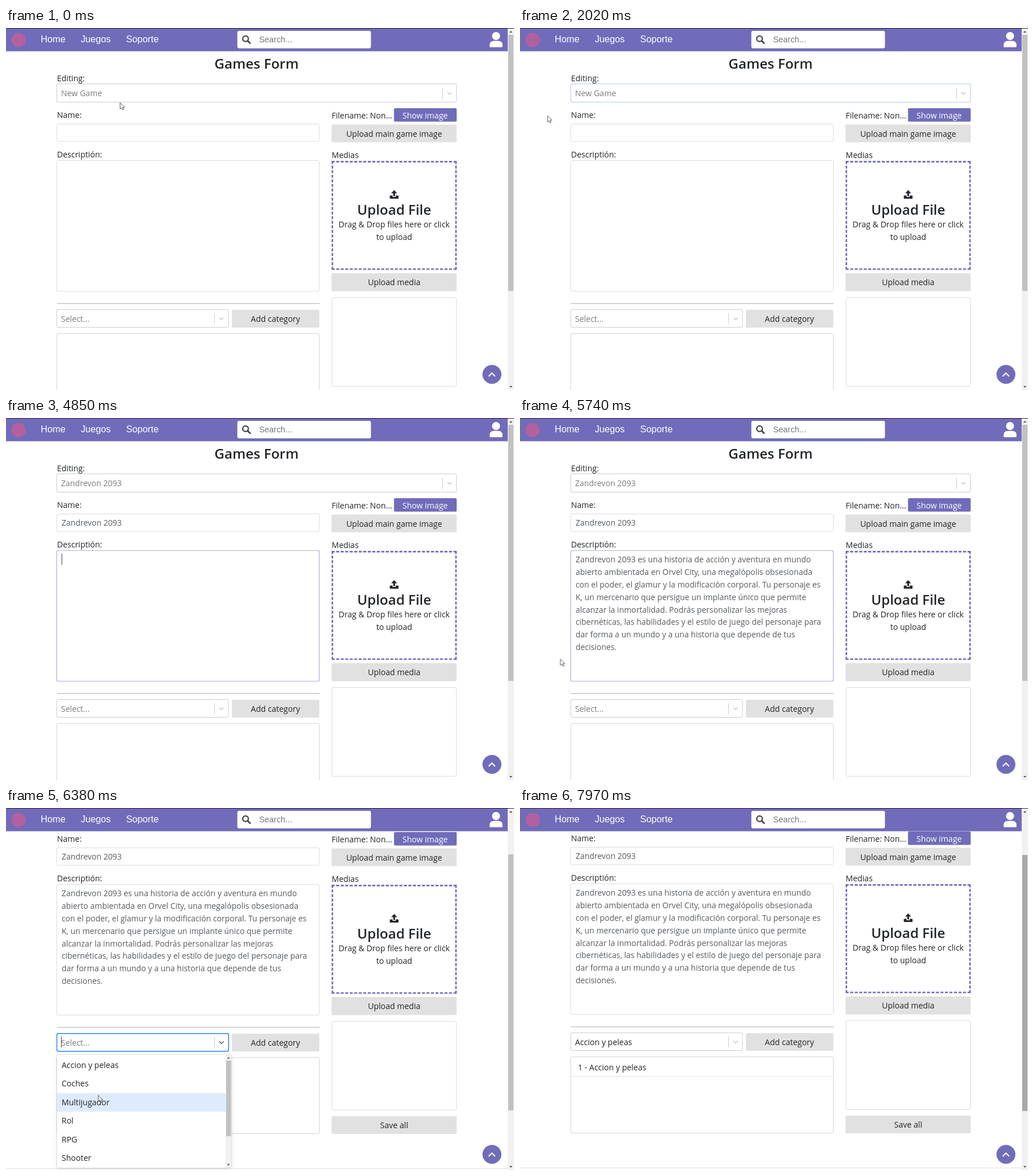
An HTML page for the animation above (8000 ms loop, 886 by 632 pixels).

```html
<!DOCTYPE html>
<html lang="es">
<head>
<meta charset="utf-8">
<title>Games Form</title>
<style>
  html, body { margin: 0; width: 100%; height: 100%; overflow: hidden; background: #fff; }
  svg { display: block; width: 886px; height: 632px; font: 14px "Open Sans", "Noto Sans", sans-serif; fill: #212529; }
  text { white-space: pre; }
  .mid { text-anchor: middle; }
  .big { font-size: 24px; font-weight: 600; }
  .nav { font: 16.2px "Liberation Sans", Arial, sans-serif; fill: #fff; }
  .hint { fill: #7c7c7c; }
  .typed { font-size: 13.88px; fill: #565b60; }
  .white { fill: #fff; }
  .brand { fill: #706cba; }
  .btn { fill: #e1e1e1; }
  .box { fill: #fff; stroke: #dcdcdc; }
  .select { fill: #fff; stroke: #ccc; }
  .line { fill: none; stroke: #ccc; }
  .dash { fill: none; stroke: #706cba; stroke-width: 2.64; }
  .chev { fill: none; stroke: #ccc; stroke-width: 1.6; stroke-linecap: round; stroke-linejoin: round; }
  .dark { stroke: #666; }
  .ring { fill: none; stroke: #2684ff; stroke-width: 1.4; }
  .glow { fill: none; stroke: #b1afdb; stroke-width: 1.2; }
  .caret { stroke: #444; }
  .menu { fill: #fff; stroke: rgba(0,0,0,.1); filter: drop-shadow(0 2.6px 3.6px rgba(0,0,0,.1)); }
  .focus { fill: #deebff; }

  .a { animation: 8s step-end infinite; }
  #page { animation-name: scroll; }
  #thumb { animation-name: thumb; }
  #cursor { animation-name: cursor; }
  #game-empty { animation-name: game-empty; }
  #game-named, #name { animation-name: named; }
  #game-focus { animation-name: game-focus; }
  #game-blur { animation-name: game-blur; }
  #game-list { animation-name: game-list; }
  #query, #no-options { animation-name: query; }
  #query-caret { animation-name: query-caret; }
  #name-glow { animation-name: name-glow; }
  #name-caret { animation-name: name-caret; }
  #desc-glow { animation-name: desc-glow; animation-timing-function: linear; }
  #desc-caret { animation-name: desc-caret; }
  #desc { animation-name: desc; }
  #desc-end { animation-name: desc-end; }
  #cat-hint { animation-name: cat-hint; }
  #cat-value { animation-name: cat-value; }
  #cat-focus { animation-name: cat-focus; }
  #cat-list { animation-name: cat-list; }
  #cat-mark { animation-name: cat-mark; }
  #cat-added { animation-name: cat-added; }
  #add { animation-name: add; }

  @keyframes scroll {
    0% { transform: none; }
    76.75% { transform: translateY(-32px); }
    77.75% { transform: translateY(-76px); }
    78.75% { transform: translateY(-94px); }
    79.75% { transform: translateY(-98px); }
    80.75% { transform: translateY(-99px); }
  }
  @keyframes thumb {
    0% { transform: none; fill: #c1c1c1; }
    76.75% { transform: translateY(23px); }
    77.75% { transform: translateY(54px); }
    78.75% { transform: translateY(66px); }
    79.75% { transform: translateY(69px); }
    80.75% { transform: translateY(70px); fill: #c1c1c1; }
    99.6%, 100% { transform: translateY(70px); fill: #a8a8a8; }
  }
  @keyframes cursor {
    0% { transform: translate(199px, 130px); }
    1% { transform: translate(199px, 130px); animation-timing-function: steps(4, start); }
    5.1% { transform: translate(190px, 116px); }
    17.25% { transform: translate(190px, 116px); animation-timing-function: steps(8, start); }
    25.25% { transform: translate(42px, 147px); animation-timing-function: steps(3, start); }
    28.25% { transform: translate(60px, 164px); animation-timing-function: steps(4, start); }
    32.3% { transform: translate(130px, 180px); animation-timing-function: steps(2, start); }
    34.4% { transform: translate(140px, 214px); }
    37.4% { transform: translate(140px, 214px); animation-timing-function: steps(4, start); }
    41.5% { transform: translate(170px, 300px); animation-timing-function: steps(4, start); }
    45.6% { transform: translate(-20px, 330px); }
    69.75% { transform: translate(-20px, 340px); animation-timing-function: steps(6, start); }
    75.75% { transform: translate(161px, 501px); }
    80.75% { transform: translate(161px, 501px); animation-timing-function: steps(3, start); }
    83.75% { transform: translate(150px, 446px); }
    85.75% { transform: translate(150px, 446px); animation-timing-function: steps(5, start); }
    90.6% { transform: translate(452px, 404px); }
    97.6% { transform: translate(452px, 404px); animation-timing-function: steps(2, start); }
    99.6%, 100% { transform: translate(890px, 300px); }
  }
  @keyframes game-empty { 0% { opacity: 1; } 9.125% { opacity: 0; } 17.25% { opacity: 1; } 34.375% { opacity: 0; } }
  @keyframes named { 0% { opacity: 0; } 34.375% { opacity: 1; } }
  @keyframes game-focus { 0% { opacity: 0; } 3% { opacity: 1; } 24.25% { opacity: 0; } }
  @keyframes game-blur { 0% { opacity: 0; } 24.25% { opacity: 1; } 26.25% { opacity: 0; } }
  @keyframes game-list { 0% { opacity: 0; } 3% { opacity: 1; } 9.125% { opacity: 0; } 17.25% { opacity: 1; } 24.25% { opacity: 0; } }
  @keyframes query { 0% { opacity: 0; } 9.125% { opacity: 1; } 17.25% { opacity: 0; } }
  @keyframes query-caret { 0% { opacity: 0; } 9.125% { opacity: 1; } 15.375% { opacity: 0; } }
  @keyframes name-glow { 0% { opacity: 0; } 32.3% { opacity: 1; } 40.5% { opacity: 0; } }
  @keyframes name-caret { 0% { opacity: 0; } 34.375% { opacity: 1; } 37.375% { opacity: 0; } }
  @keyframes desc-glow {
    0%, 40.5% { opacity: 0; }
    42.5%, 49.6% { opacity: 1; }
    51.6%, 57.6% { opacity: 0; }
    60.6%, 75.75% { opacity: 1; }
    76.75%, 100% { opacity: 0; }
  }
  @keyframes desc-caret { 0% { opacity: 0; } 41.5% { opacity: 1; } 49.6% { opacity: 0; } 60.6% { opacity: 1; } 63.875% { opacity: 0; } }
  @keyframes desc { 0% { opacity: 0; } 63.875% { opacity: 1; } }
  @keyframes desc-end { 0% { opacity: 0; } 63.875% { opacity: 1; } 69.75% { opacity: 0; } }
  @keyframes cat-hint { 0% { opacity: 1; } 84.75% { opacity: 0; } }
  @keyframes cat-value { 0% { opacity: 0; } 84.75% { opacity: 1; } }
  @keyframes cat-focus { 0% { opacity: 0; } 77.75% { opacity: 1; } 92.6% { opacity: .4; } 93.6% { opacity: 0; } }
  @keyframes cat-list { 0% { opacity: 0; } 76.75% { opacity: 1; } 84.75% { opacity: 0; } }
  @keyframes cat-mark {
    0% { transform: none; }
    77.75% { transform: translateY(32.4px); }
    78.75% { transform: translateY(64.8px); }
    81.75% { transform: translateY(32.4px); }
    82.75% { transform: none; }
  }
  @keyframes cat-added { 0% { opacity: 0; } 94.6% { opacity: 1; } }
  @keyframes add { 0% { fill: #e1e1e1; } 89.6% { fill: #d4d4d4; } 97.6% { fill: #e1e1e1; } }
</style>
</head>
<body>
<svg viewBox="0 0 886 632">
  <g id="page" class="a">
    <text class="mid big" x="437" y="71">Games Form</text>

    <text x="89" y="92.5">Editing:</text>
    <rect class="select" x="88.5" y="97.5" width="697" height="32" rx="2.5"/>
    <rect id="game-blur" class="a line" style="stroke:#b9cbe6" x="88.5" y="97.5" width="697" height="32" rx="2.5"/>
    <path class="line" d="M761.5 104v20"/>
    <path class="chev" d="M770.3 112.5l3.3 3.3 3.3-3.3"/>
    <text id="game-empty" class="a hint" x="96" y="119">New Game</text>
    <text id="game-named" class="a hint" x="96" y="119">Zandrevon 2093</text>
    <g id="game-focus" class="a">
      <rect class="ring" x="88.7" y="97.7" width="697.3" height="31.9" rx="2.5"/>
      <path class="chev dark" d="M770.3 112.5l3.3 3.3 3.3-3.3"/>
    </g>
    <text id="query" class="a" x="96" y="119" style="fill:#444">Zandrevon 2093</text>
    <path id="query-caret" class="a caret" d="M201.5 104v19"/>

    <text x="89" y="157">Name:</text>
    <rect class="box" x="88.5" y="167.5" width="458" height="30.5" rx="2.5"/>
    <rect id="name-glow" class="a glow" x="88.5" y="167.5" width="458" height="30.5" rx="2.5"/>
    <text id="name" class="a typed" x="97" y="188">Zandrevon 2093</text>
    <path id="name-caret" class="a caret" d="M203.5 174v18"/>

    <text x="89" y="225.5">Descriptión:</text>
    <rect class="box" x="88.5" y="231.5" width="458" height="228" rx="2.5"/>
    <rect id="desc-glow" class="a glow" x="88.5" y="231.5" width="458" height="228" rx="2.5"/>
    <path id="desc-caret" class="a caret" d="M97.5 237v19"/>
    <g id="desc" class="a typed">
      <text x="97" y="251.5">Zandrevon 2093 es una historia de acción y aventura en mundo</text>
      <text x="97" y="273.5">abierto ambientada en Orvel City, una megalópolis obsesionada</text>
      <text x="97" y="295.5">con el poder, el glamur y la modificación corporal. Tu personaje es</text>
      <text x="97" y="317.5">K, un mercenario que persigue un implante único que permite</text>
      <text x="97" y="339.5">alcanzar la inmortalidad. Podrás personalizar las mejoras</text>
      <text x="97" y="361.3">cibernéticas, las habilidades y el estilo de juego del personaje para</text>
      <text x="97" y="383">dar forma a un mundo y a una historia que depende de tus</text>
      <text x="97" y="405">decisiones.</text>
    </g>
    <path id="desc-end" class="a caret" d="M97.5 412v19"/>

    <text x="568" y="157.5">Filename: Non...</text>
    <rect class="brand" x="676.7" y="140" width="109.3" height="23.5" rx="2"/>
    <text class="mid white" x="731" y="157.5">Show image</text>
    <rect class="btn" x="567.7" y="168.6" width="218.3" height="31" rx="2"/>
    <text class="mid" x="677" y="189.5">Upload main game image</text>
    <text x="568" y="227">Medias</text>
    <path class="dash" stroke-dasharray="5.28 2.59" d="M568 233.4h218M568 421h218"/>
    <path class="dash" stroke-dasharray="5.28 2.75" d="M569.2 232.1v190M784.8 232.1v190"/>
    <path d="M677 283l5.2 5.4h-3.6v5.2h-3.2v-5.2h-3.6zM670 292.5h4.2v2.6h5.6v-2.6h4.2q.6 0 .6.7v4q0 .8-.8.8h-13.6q-.8 0-.8-.8v-4q0-.7.6-.7z"/>
    <text class="mid big" x="677" y="326">Upload File</text>
    <text class="mid" x="677" y="348">Drag &amp; Drop files here or click</text>
    <text class="mid" x="677" y="370">to upload</text>
    <rect class="btn" x="567.7" y="428" width="218.3" height="31.5" rx="2"/>
    <text class="mid" x="677" y="448.5">Upload media</text>
    <rect class="box" x="568.5" y="470.5" width="217" height="155" rx="2.5"/>
    <rect class="btn" x="567.7" y="636" width="218.3" height="31" rx="2"/>
    <text class="mid" x="677" y="656.5">Save all</text>

    <path class="line" style="stroke:#a3a8a3" d="M89 481h458"/>
    <rect class="select" x="88.5" y="491.5" width="299.5" height="31" rx="2.5"/>
    <path class="line" d="M363.5 498v19"/>
    <path class="chev" d="M372.5 506l3.3 3.3 3.3-3.3"/>
    <text id="cat-hint" class="a hint" x="96" y="512.5">Select...</text>
    <text id="cat-value" class="a" x="96" y="512.5">Accion y peleas</text>
    <g id="cat-focus" class="a">
      <rect class="ring" x="88.7" y="491.7" width="299.6" height="31" rx="2.5"/>
      <path class="chev dark" d="M372.5 506l3.3 3.3 3.3-3.3"/>
    </g>
    <rect id="add" class="a btn" x="394" y="492" width="152.5" height="31" rx="2"/>
    <text class="mid" x="470" y="513">Add category</text>
    <rect class="box" x="88.5" y="533.5" width="458" height="133" rx="2.5" style="stroke:#d4d4d4"/>
    <g id="cat-added" class="a">
      <path class="line" style="stroke:#e4e4e4" d="M89 567.5h457"/>
      <text x="101" y="556.5">1 - Accion y peleas</text>
    </g>
    <path class="line" style="stroke:#dedede" d="M0 727.5h875"/>

    <g id="game-list" class="a">
      <rect class="menu" x="88.5" y="134.5" width="697.5" height="202" rx="3"/>
      <rect class="focus" x="89" y="138" width="697" height="32.4"/>
      <text x="97" y="159">New Game</text>
      <text x="97" y="191.4">Talmora Rift</text>
      <text x="97" y="223.8">Quendal Racing</text>
      <text x="97" y="256.2">Hexavorn</text>
      <text x="97" y="288.6">Brumelia</text>
      <text x="97" y="321">Ostravane II</text>
    </g>
    <g id="no-options" class="a">
      <rect class="menu" x="88.5" y="134.5" width="697.5" height="38" rx="3"/>
      <text class="mid" x="437.5" y="159" style="fill:#999">No options</text>
    </g>

    <g id="cat-list" class="a">
      <path class="caret" d="M96.5 497v19"/>
      <rect class="menu" x="88.5" y="528.5" width="305" height="198" rx="3"/>
      <rect id="cat-mark" class="a focus" x="89" y="531" width="294" height="32.4"/>
      <text x="97" y="552">Accion y peleas</text>
      <text x="97" y="584.4">Coches</text>
      <text x="97" y="616.8">Multijugador</text>
      <text x="97" y="649.2">Rol</text>
      <text x="97" y="681.8">RPG</text>
      <text x="97" y="714.4">Shooter</text>
      <path fill="#f1f1f1" d="M383 529h10v197h-10z"/>
      <path fill="#c1c1c1" d="M384 539h8.5v132h-8.5z"/>
      <path fill="#555" d="M385.5 535.5l2.5-3 2.5 3zM385.5 719.5l2.5 3 2.5-3z"/>
    </g>
  </g>

  <rect class="brand" width="875" height="40.6"/>
  <circle cx="22" cy="21" r="12.5" fill="#b3609f"/>
  <text class="nav" x="60.5" y="25">Home</text>
  <text class="nav" x="130.5" y="25">Juegos</text>
  <text class="nav" x="209.5" y="25">Soporte</text>
  <rect class="white" x="403.5" y="5" width="233" height="30.5" rx="3"/>
  <circle cx="417.8" cy="18.8" r="4.9" fill="none" stroke="#444" stroke-width="2.3"/>
  <path d="M421.6 22.6l4 4" stroke="#444" stroke-width="2.8" stroke-linecap="round"/>
  <text class="nav" x="441.5" y="25" style="font-size:14.4px;fill:#757575">Search...</text>
  <circle class="white" cx="854.7" cy="14" r="7"/>
  <path class="white" d="M843.5 32.5v-2.5q0-7.5 7.5-7.5h7.5q7.5 0 7.5 7.5v2.5q0 1-1 1h-20.5q-1 0-1-1z"/>

  <circle class="brand" cx="847.5" cy="604.7" r="16.5"/>
  <path d="M842.5 607.5l5-5 5 5" fill="none" stroke="#fff" stroke-width="2.2" stroke-linecap="round" stroke-linejoin="round"/>

  <path fill="#f1f1f1" d="M875 0h11v632h-11z"/>
  <path fill="#555" d="M877.8 8l2.7-3 2.7 3zM877.8 625l2.7 3 2.7-3z"/>
  <rect id="thumb" class="a" x="876" y="12" width="9" height="447" fill="#c1c1c1"/>
  <rect width="886" height="1" fill="#33203f"/>

  <path id="cursor" class="a" d="M0 .5v10.8l2.5-2.3 1.9 4 1.8-.8-1.8-3.9h3.4z" fill="#fff" stroke="#444" stroke-width=".9" stroke-linejoin="round"/>
</svg>
</body>
</html>
```
